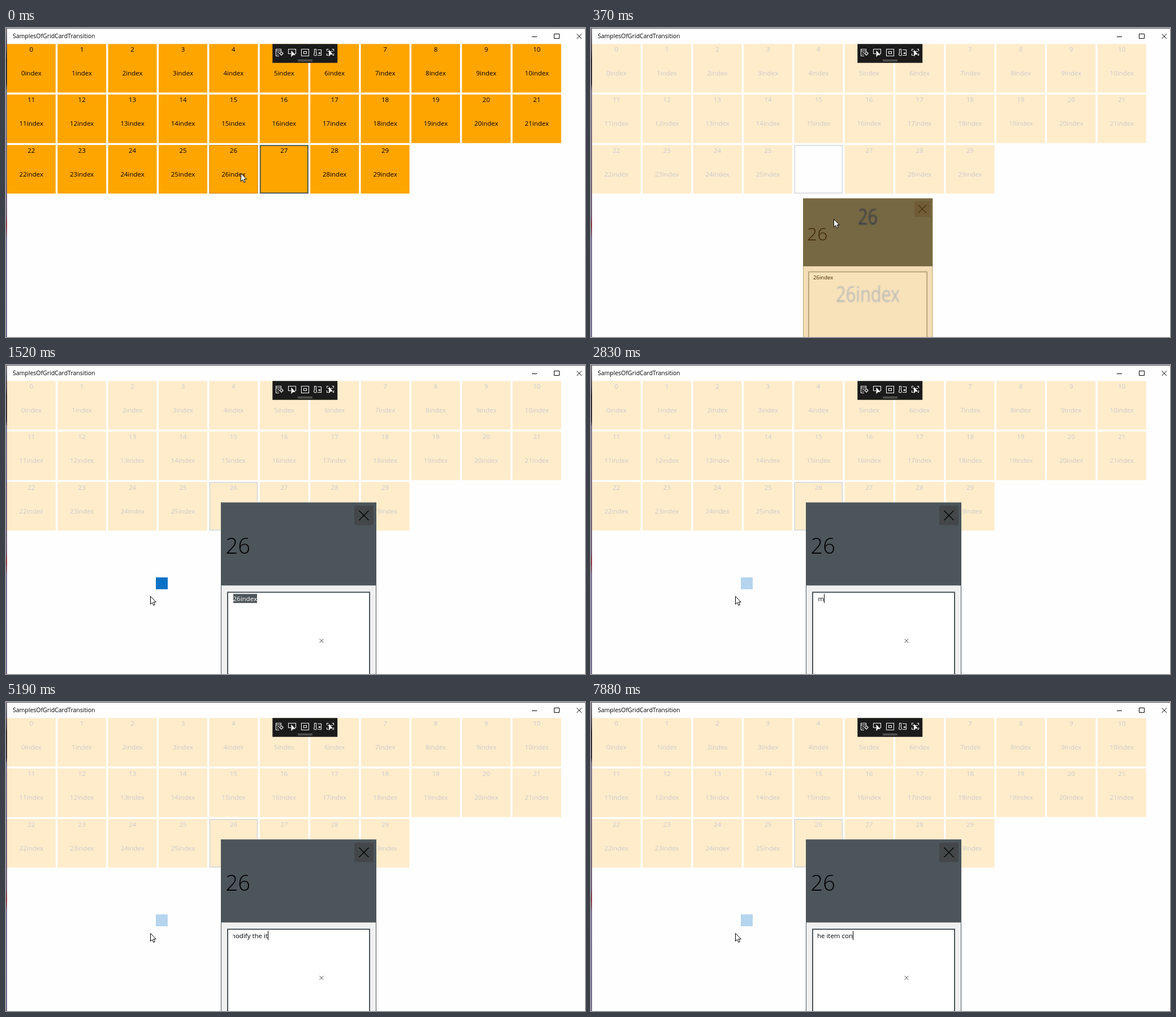
An HTML page for the animation above (8000 ms loop, 1024 by 547 pixels).

```html
<!DOCTYPE html>
<html lang="en">
<head>
<meta charset="utf-8">
<title>Card transition</title>
<style>
  html, body { margin: 0; width: 100%; height: 100%; overflow: hidden; background: #fefefe; }
  svg { display: block; width: 100%; height: 100%; }
  text { font: 11.5px "Open Sans", "Noto Sans", sans-serif; white-space: pre; }
  .mid { text-anchor: middle; }
  .line { fill: none; stroke: #000; }
  .tools { fill: none; stroke: #f2f2f2; stroke-width: 1.1; }
  #source text { filter: blur(.35px); }
</style>
</head>
<body>
<svg viewBox="0 0 1024 547">
  <defs>
    <linearGradient id="desk" x2="0" y2="1">
      <stop offset="0" stop-color="#6b6574"/>
      <stop offset=".07" stop-color="#3a2c40"/>
      <stop offset=".1" stop-color="#120a14"/>
      <stop offset=".18" stop-color="#1a1020"/>
      <stop offset=".2" stop-color="#6c6080"/>
      <stop offset=".6" stop-color="#5c4462"/>
      <stop offset=".64" stop-color="#7a1420"/>
      <stop offset=".68" stop-color="#685c86"/>
      <stop offset="1" stop-color="#5e567c"/>
    </linearGradient>
    <clipPath id="field"><rect x="21" y="160" width="64" height="22"/></clipPath>
  </defs>

  <rect width="1024" height="547" fill="#fefefe"/>
  <g id="grid"></g>
  <rect id="veil" x="2" y="28" width="1022" height="519" fill="#fefefe" opacity=".8"/>

  <g id="card">
    <g id="source" transform="scale(3.198 4.012)">
      <rect width="86" height="86" fill="#ffa500"/>
      <text class="mid" x="43" y="14">26</text>
      <text class="mid" x="43" y="56">26index</text>
    </g>
    <g id="dest">
      <rect width="275" height="345" fill="#f0f0f1"/>
      <path id="sides" class="line" d="M.5 147V345M274.5 147V345"/>
      <rect width="275" height="147" fill="#4c555a"/>
      <rect x="236" y="6" width="34" height="34" fill="#434749"/>
      <path class="line" stroke-width="1.3" d="M244.500 14.500l17 17m0-17l-17 17"/>
      <text x="8.500" y="91" style="font-size:38px;font-weight:300">26</text>
      <rect id="box" x="12" y="159" width="251" height="174" stroke-width="2"/>
      <rect id="mark" x="22" y="162" width="42" height="16" fill="#4c555a"/>
      <g clip-path="url(#field)">
        <text id="entry" y="175"></text>
        <path id="wave" fill="none" stroke="#f00"/>
      </g>
      <rect id="caret" y="162" width="1" height="16"/>
      <path id="clear" class="line" style="stroke:#444" d="M174.500 241.500l7 7m0-7l-7 7"/>
    </g>
  </g>

  <rect id="badge" x="265" y="376" width="21" height="21" fill="#0a72c6"/>

  <rect x="471.300" y="28.300" width="114.900" height="33.400" fill="#1b1b1b"/>
  <path d="M516 56.500h26M516 58.500h26" stroke="#777"/>
  <g class="tools">
    <path d="M483 49.500h-5.500v-12h9v3M477.500 40.500h9M480 43.500h3M480 46.500h2"/>
    <circle cx="487" cy="45" r="2.300"/>
    <path d="M487 41v2m0 4v2m-4-4h2m4 0h2"/>
    <path d="M504 45.500h-4.500v-8h13v8h-2"/>
    <path d="M505 41v9l2.300-2.500h3.400z" fill="#f2f2f2"/>
    <path d="M522.500 37.500h13v12h-13zM526.500 41.500h5v4h-5z"/>
    <path d="M545.500 37.500h3v7a2.500 2.500 0 1 1-3 0zM551 38.500h6.500v10h-6.500M553.500 43.500h2v2h-2z"/>
    <path d="M567.500 41v-3.500h3m6 0h3v3.500m0 4v3.500h-2m-7 0h-3v-3.500M569 41.500h9"/>
    <path d="M571.500 40v9l2.300-2.500h3.400z" fill="#f2f2f2"/>
  </g>

  <text x="12" y="18" style="font-size:10.500px">SamplesOfGridCardTransition</text>
  <path class="line" d="M930 15.500h9M969.500 10.500h9v8h-9zM1009.500 10.500l8.500 8.500m0-8.500l-8.500 8.500"/>
  <rect width="1024" height="1" fill="#4b4652"/>
  <rect width="1.700" height="547" fill="url(#desk)"/>
  <path id="pointer" d="M.5.5v14l3.200-3 2.200 5 2.300-1-2.200-4.800h4.300z" fill="#fff" stroke="#000"/>
</svg>

<script>
const $ = id => document.getElementById(id);
const show = (id, on) => $(id).setAttribute("display", on ? "inline" : "none");
const set = (id, attrs) => {
  for (const key in attrs) $(id).setAttribute(key, attrs[key]);
};
const clamp = v => Math.min(1, Math.max(0, v));

const LOOP = 8000, OPEN = 200, FLIGHT = 300, FOCUS = OPEN + FLIGHT, SELECT = 1520;

// Grid of 30 cells, 11 per row
const PITCH = 89.4;
let cells = "";
for (let i = 0; i < 30; i++) {
  const x = 1.8 + PITCH * (i % 11);
  const y = 28.3 + PITCH * Math.floor(i / 11);
  cells += `<g transform="translate(${x} ${y})"><g id="cell${i}">
    <rect width="86" height="86" fill="#ffa500"/>
    <text class="mid" x="43" y="13.700">${i}</text>
    <text class="mid" x="43" y="55.700">${i === 27 ? "" : i + "index"}</text></g>
    <rect id="edge${i}" x=".9" y=".9" width="84.200" height="84.200" fill="none" stroke="#3f535c" stroke-width="1.700" display="none"/></g>`;
}
$("grid").innerHTML = cells + `<rect id="hover" x="360" y="207.600" width="85" height="85" fill="none" stroke="#cc8613"/>`;

// Typed text: [time, content]
const keys = [[0, "26index"]];
function type(from, to, added) {
  const base = from === 2830 ? "" : keys[keys.length - 1][1];
  for (let i = 0; i < added.length; i++)
    keys.push([from + (to - from) * i / (added.length - 1), base + added.slice(0, i + 1)]);
}
type(2830, 3810, "modify ");
type(3950, 4290, "the ");
type(4730, 5450, "iten");
keys.push([6260, "modify the itenm"], [6490, "modify the iten"], [6840, "modify the ite"]);
type(7013, 7880, "m con");

const path = [
  [0, 415, 257], [200, 419, 270], [370, 429, 338], [450, 431, 372],
  [560, 424, 399], [800, 330, 419], [1060, 255, 409], [LOOP, 255, 409]
];
function pointerAt(t) {
  const i = path.findIndex(k => k[0] > t);
  const a = path[i - 1], b = path[i], f = (t - a[0]) / (b[0] - a[0]);
  return [a[1] + (b[1] - a[1]) * f, a[2] + (b[2] - a[2]) * f];
}

// cubic-bezier(.8, 0, .2, 1)
function ease(u) {
  let lo = 0, hi = 1, s = .5;
  for (let i = 0; i < 24; i++) {
    s = (lo + hi) / 2;
    const x = 2.4 * s * (1 - s) ** 2 + .6 * s * s * (1 - s) + s ** 3;
    if (x < u) lo = s; else hi = s;
  }
  return 3 * s * s - 2 * s ** 3;
}

// The card grows out of its cell, dipping below the straight path
function drawCard(t) {
  const u = clamp((t - OPEN) / FLIGHT);
  const p = u < 1 ? ease(u) : 1;
  const width = 86 + 189 * p, height = 86 + 259 * p;
  const dip = u < 1 ? 69 * Math.sin(Math.PI * u) ** 1.3 : 0;
  const x = 402.5 + 115 * p - width / 2;
  const y = 208 + 35.3 * p + dip;
  set("card", { transform: `translate(${x} ${y}) scale(${width / 275} ${height / 345})` });
  set("dest", { opacity: p });
  show("card", t >= OPEN);
  show("source", u < 1);
}

function drawEntry(t) {
  const focused = t >= FOCUS, selected = t >= SELECT && t < 2830, typing = t >= 2830;
  const content = keys.filter(k => k[0] <= t).pop()[1];
  const entry = $("entry");
  entry.textContent = content.replace(/ /g, "\u00a0");
  const width = entry.getComputedTextLength();
  const x = Math.min(21.5, 83 - width);
  set("entry", { x, fill: selected ? "#fff" : "#000" });
  set("box", { fill: focused ? "#fff" : "#f6f6f5", stroke: focused ? "#4c555a" : "#979894" });
  set("sides", { style: `stroke:${focused ? "#4c555a" : "#979894"}` });
  set("caret", { x: Math.round(x + width) });
  show("caret", typing);
  show("mark", selected);
  show("clear", focused);

  const misspelt = t >= 5810 && t < 6840;
  show("wave", misspelt);
  if (misspelt) {
    const start = x + entry.getSubStringLength(0, 11);
    set("wave", { d: `M${start} 178` + "l2 -2l2 2".repeat(5) });
  }
}

function draw(now) {
  const t = now % LOOP, open = t >= OPEN;
  show("veil", open);
  show("hover", !open);
  show("edge27", !open);
  show("edge26", open);
  show("cell26", !open || t >= FOCUS);
  drawCard(t);
  drawEntry(t);
  show("badge", t >= SELECT);
  set("badge", { opacity: 1 - .7 * clamp((t - 1620) / 910) });
  set("pointer", { transform: `translate(${pointerAt(t).map(Math.round)})` });
}

function tick() {
  draw(performance.now());
  requestAnimationFrame(tick);
}
tick();
</script>
</body>
</html>
```
